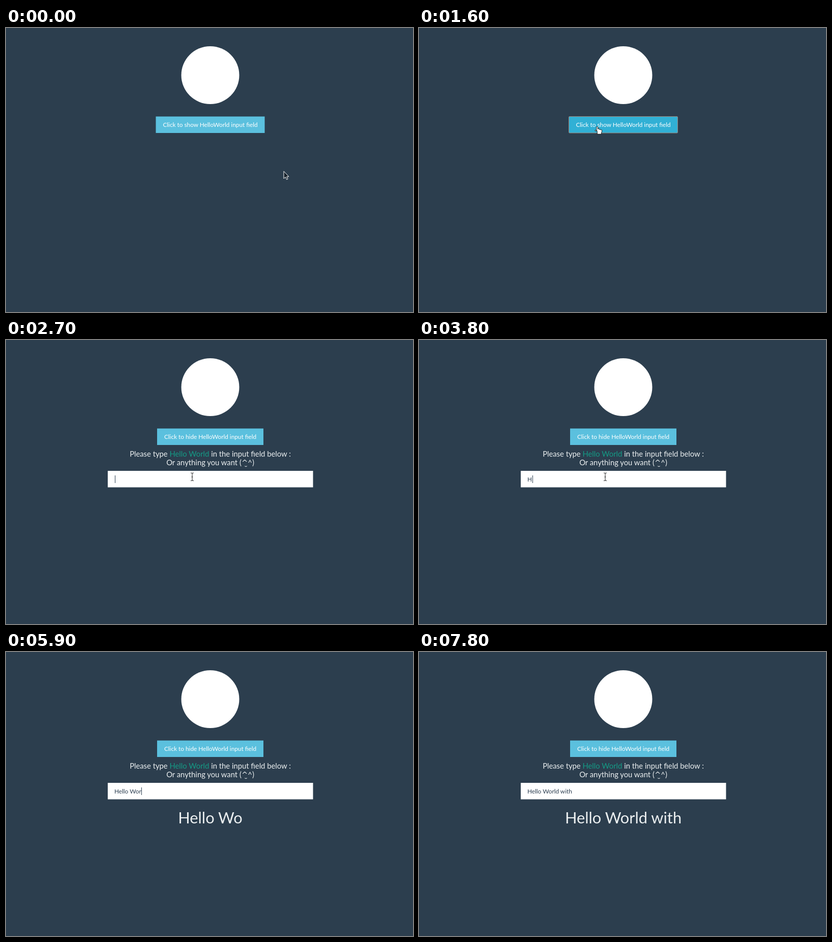
Write an HTML page that moves like this. It is 800 by 560 pixels and loops after 8 s.

```html
<!DOCTYPE html>
<html lang="en">
<head>
<meta charset="utf-8">
<title>Hello World input</title>
<style>
  html, body { margin: 0; width: 100%; height: 100%; overflow: hidden; background: #2c3e4e; }
  svg { display: block; width: 800px; height: 560px; }
  text { font-family: Lato, sans-serif; fill: #ecf0f1; white-space: pre; }
  .mid { text-anchor: middle; }
  .small { font-size: 11.8px; }
  .prompt { font-size: 14.8px; }
  #title { font-size: 30.8px; }
</style>
</head>
<body>
<svg viewBox="0 0 800 560">
  <circle cx="401.5" cy="93" r="57" fill="#fff"/>
  <rect id="button" y="174.5" height="32.5"/>
  <text id="label" class="mid small" x="401.5" y="195" style="fill:#fff"></text>
  <g id="panel">
    <text class="mid prompt" x="401.5" y="230">Please type <tspan fill="#149c86">Hello World</tspan> in the input field below :</text>
    <text class="mid prompt" x="401.5" y="247">Or anything you want (<tspan font-family="DejaVu Sans, sans-serif">^&#x32E;</tspan>^)</text>
    <rect x="200" y="258" width="403.5" height="32.5" fill="#fff"/>
    <text id="typed" class="small" x="213" y="279" style="fill:#2c3e50"></text>
    <rect id="caret" y="267" width="1" height="15" fill="#2c3e50"/>
    <text id="title" class="mid" x="401.5" y="338"></text>
  </g>
  <path id="arrow" d="M0 0V14.5L3.3 11.4L5.6 16.3L8 15.2L5.8 10.6H10Z" fill="#17222c" stroke="#fff"/>
  <path id="hand" d="M-2.2 .8C-2.2-1 .5-1 .6.8V5C2-.1 3.7 4.9 3.7 5.4C5 4.4 6.2 5.1 6.3 6C8 5.2 8.8 6.2 8.6 7.5C8.6 10.5 7.2 11.5 7.2 14.3H-.6C-1-.1-1 11.8-5 7.6C-5.6 6.2-4.1 5.7-2.2 7.6Z" fill="#fff" stroke="#111"/>
  <path id="beam" d="M-3-8Q0-8 0-6.5Q0-8 3-8M0-6.5V6M-3 7.5Q0 7.5 0 6Q0 7.5 3 7.5M-1.5 0H1.5" fill="none" stroke-width="1.1"/>
</svg>
<script>
const LOOP = 8000, STEP = 100;
const PRESS = 1600, OPEN = 1700, LEAVE = 1900, FOCUS = 2700, HIDE = 4200;
const BLINK = 600, ECHO_DELAY = 200, CENTER = 401.5;
const REST = [546, 282.5], ON_BUTTON = [351, 195], ON_INPUT = [366, 270];

// Typing bursts: start, ms per key, text
const bursts = [
  [3800, 0, 'H'], [4400, 120, 'ello '], [5500, 150, 'World'], [6500, 100, ' w'], [6900, 50, 'ith']
];
const keys = bursts.flatMap(([start, gap, text]) =>
  [...text].map((char, i) => ({ char, at: start + i * gap })));

const $ = id => document.getElementById(id);
const set = (el, attrs) => { for (const k in attrs) el.setAttribute(k, attrs[k]); };
const show = (el, on) => { el.style.display = on ? '' : 'none'; };
const pressed = t => keys.filter(k => k.at <= t);
const textAt = t => pressed(t).map(k => k.char).join('');

function glide(t, start, end, from, to) {
  const p = Math.min(1, Math.max(0, (t - start) / (end - start)));
  const e = p * p * (3 - 2 * p);
  return from.map((v, i) => v + (to[i] - v) * e);
}

function caretOn(t) {
  const last = pressed(t).reduce((at, k) => k.at, FOCUS);
  return t >= FOCUS && (t - last) % (2 * BLINK) < BLINK;
}

function render(t) {
  const open = t >= OPEN;
  const focused = t >= PRESS && t < FOCUS;
  const [x, y] = t < LEAVE
    ? glide(t, 0, 900, REST, ON_BUTTON)
    : glide(t, LEAVE, FOCUS, ON_BUTTON, ON_INPUT);
  const width = open ? 209 : 214;
  const over = Math.abs(x - CENTER) < width / 2 && y > 174 && y < 207;

  set($('button'), {
    x: CENTER - width / 2, width, rx: focused ? 1.5 : 0,
    fill: over ? '#31b0d5' : '#5bc0de',
    stroke: focused ? '#a08478' : 'none'
  });
  $('label').textContent = `Click to ${open ? 'hide' : 'show'} HelloWorld input field`;

  show($('panel'), open);
  $('typed').textContent = textAt(t);
  $('title').textContent = textAt(t - ECHO_DELAY).trimEnd();
  show($('caret'), caretOn(t));
  set($('caret'), { x: Math.round(213.5 + $('typed').getComputedTextLength()) });

  const kind = t >= HIDE ? '' : over ? 'hand' : open ? 'beam' : 'arrow';
  for (const id of ['arrow', 'hand', 'beam']) {
    show($(id), id === kind);
    set($(id), { transform: `translate(${x} ${y})` });
  }
  set($('beam'), { stroke: y < 258 ? '#dde3e7' : '#333' });
}

const start = performance.now();
function tick() {
  const t = (performance.now() - start) % LOOP;
  render(Math.floor(t / STEP) * STEP);
  requestAnimationFrame(tick);
}
tick();
</script>
</body>
</html>
```
